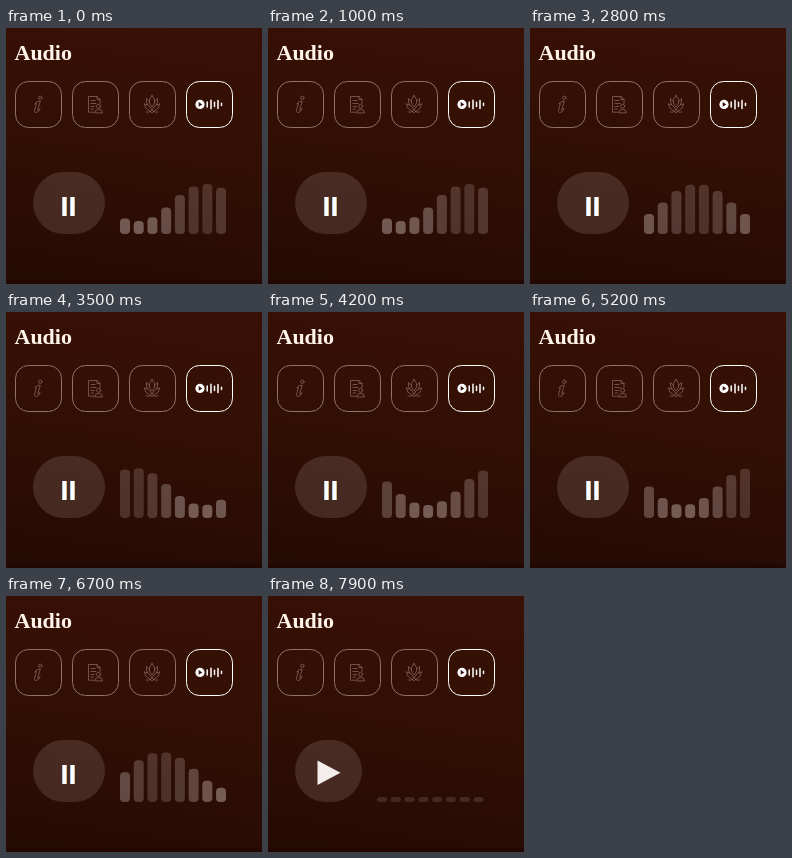
These frames come from a looping animation (256x256 px, 8000 ms). An HTML page with a canvas:

```html
<!DOCTYPE html>
<html lang="en">
<head>
<meta charset="utf-8">
<title>Audio</title>
<style>
  html, body { margin: 0; width: 100%; height: 100%; overflow: hidden; background: #2e0e04; }
  canvas, svg { position: absolute; left: 0; top: 0; width: 256px; height: 256px; display: block; }
  text { font: bold 22px "Liberation Serif", "Times New Roman", serif; fill: #fff3ea; }
  .box { fill: none; stroke: #8f7368; stroke-width: 1; }
  .box.on { stroke: #fff; }
  .line { fill: none; stroke: #856459; stroke-width: .8; stroke-linejoin: round; stroke-linecap: round; }
  .wave { fill: none; stroke: #fff; stroke-width: 1.5; stroke-linecap: round; }
</style>
</head>
<body>
<canvas id="stage" width="256" height="256"></canvas>
<svg viewBox="0 0 256 256">
  <text x="8.5" y="32">Audio</text>

  <rect class="box" x="9.5" y="53.5" width="46" height="46" rx="13"/>
  <rect class="box" x="66.5" y="53.5" width="46" height="46" rx="13"/>
  <rect class="box" x="123.5" y="53.5" width="46" height="46" rx="13"/>
  <rect class="box on" x="180.5" y="53.5" width="46" height="46" rx="13"/>

  <g class="line">
    <circle cx="34.3" cy="69.8" r="1.7"/>
    <path d="M29 75.5 Q31 73 34.3 73.2 L31.7 81.8 Q32.4 82.3 34.2 80.6 Q32.5 84.8 29.6 84.6 Q28 84 28.7 81.5 L30.3 76 Z"/>
  </g>

  <g class="line">
    <path d="M88 84.2 H82.5 V68.5 H91 L94 71.5 V75.5 M91 68.5 V71.5 H94"/>
    <path d="M85 72.5 H89 M85 75.5 H90 M85 78.5 H88.5 M85 81 H87.5"/>
    <circle cx="92.6" cy="78.3" r="2"/>
    <path d="M88.7 84.5 Q88.7 81.4 92.6 81.4 Q96.5 81.4 96.5 84.5 Z"/>
  </g>

  <g class="line">
    <path d="M146 67.5 Q150 71.5 148.5 75 Q147.5 77.5 146 79 Q144.5 77.5 143.5 75 Q142 71.5 146 67.5 Z"/>
    <path d="M142.8 73 Q141 71.5 140.5 70.5 Q139.8 74.5 141.8 77 Q139.5 76.5 138.3 75.8 Q139 81 143 82.5 Q145 83 146 85 Q147 83 149 82.5 Q153 81 153.7 75.8 Q152.5 76.5 150.2 77 Q152.2 74.5 151.5 70.5 Q151 71.5 149.2 73"/>
    <path d="M141.8 77 Q145 79 146 82.5 Q147 79 150.2 77 M140 84 Q143 84.8 144.5 83.5 M152 84 Q149 84.8 147.5 83.5"/>
  </g>

  <circle cx="194" cy="76.4" r="4.6" fill="#fff"/>
  <path d="M192.7 74 L196.3 76.4 L192.7 78.8 Z" fill="#34110a"/>
  <path class="wave" d="M201.2 74 V79 M205 72.3 V80.7 M208.5 74.2 V78.6 M212 72.6 V80.4 M215.5 75.2 V77.6"/>
</svg>
<script>
const LOOP = 8000, STEP = 100, STOP = 7400;
const BARS = 8, FLOOR = 206, LOW = 13, HIGH = 50;
const ctx = document.getElementById('stage').getContext('2d');

// Slight timing wobble of the wave: [ms, bar offset]
const wobble = [[0, .9], [1000, .9], [2800, .5], [4200, .9], [5200, .5], [6700, .63], [8000, .63]];

function offsetAt(t) {
  const i = wobble.findIndex(p => p[0] > t);
  const [t0, a] = wobble[i - 1], [t1, b] = wobble[i];
  return a + (b - a) * (t - t0) / (t1 - t0);
}

// cubic-bezier(.42, 0, .58, 1)
function easeInOut(x) {
  let lo = 0, hi = 1;
  for (let i = 0; i < 24; i++) {
    const s = (lo + hi) / 2;
    const bx = 1.26 * s * (1 - s) * (1 - s) + 1.74 * s * s * (1 - s) + s * s * s;
    if (bx < x) lo = s; else hi = s;
  }
  return lo * lo * (3 - 2 * lo);
}

// Back-and-forth swing with a period of 2
function swing(u) {
  const m = ((u % 2) + 2) % 2;
  return easeInOut(m < 1 ? m : 2 - m);
}

function pill(x, y, w, h, r, fill) {
  ctx.fillStyle = fill;
  ctx.beginPath();
  ctx.roundRect(x, y, w, h, r);
  ctx.fill();
}

function rect(x, y, w, h, fill) {
  ctx.fillStyle = fill;
  ctx.fillRect(x, y, w, h);
}

const white = a => `rgba(255,242,238,${a})`;

function background() {
  const g = ctx.createLinearGradient(150, 0, 110, 256);
  g.addColorStop(0, '#381005');
  g.addColorStop(.5, '#310f04');
  g.addColorStop(1, '#260b03');
  rect(0, 0, 256, 256, g);
  rect(0, 252, 256, 4, 'rgba(20,0,0,.35)');
}

function playing(t) {
  pill(27, 144, 72, 62, 31, white(.125));
  for (const x of [56, 64]) {
    rect(x, 169, 1, 19, '#a9cdea');
    rect(x + 1, 169, 3, 19, '#fff');
    rect(x + 4, 169, 1, 19, '#d9b88a');
  }
  const start = offsetAt(t) + t / 100;
  for (let i = 0; i < BARS; i++) {
    const k = swing((i - start) / 5);
    const h = LOW + (HIGH - LOW) * k;
    pill(114 + i * 13.72, FLOOR - h, 10, h, 4, white(.35 - .19 * k));
  }
}

function stopped() {
  pill(27, 144, 67, 62, 31, white(.125));
  ctx.fillStyle = '#f3edeb';
  ctx.beginPath();
  ctx.moveTo(49.5, 164.5);
  ctx.lineTo(72.5, 176.8);
  ctx.lineTo(49.5, 189);
  ctx.fill();
  for (let i = 0; i < BARS; i++) pill(109 + i * 13.8, 201, 10, 5, 2.5, white(.125));
}

function draw(now) {
  const t = Math.floor((now % LOOP) / STEP) * STEP;
  background();
  if (t < STOP) playing(t); else stopped();
}

const begin = performance.now();
function tick() {
  draw(performance.now() - begin);
  requestAnimationFrame(tick);
}
tick();
</script>
</body>
</html>
```
